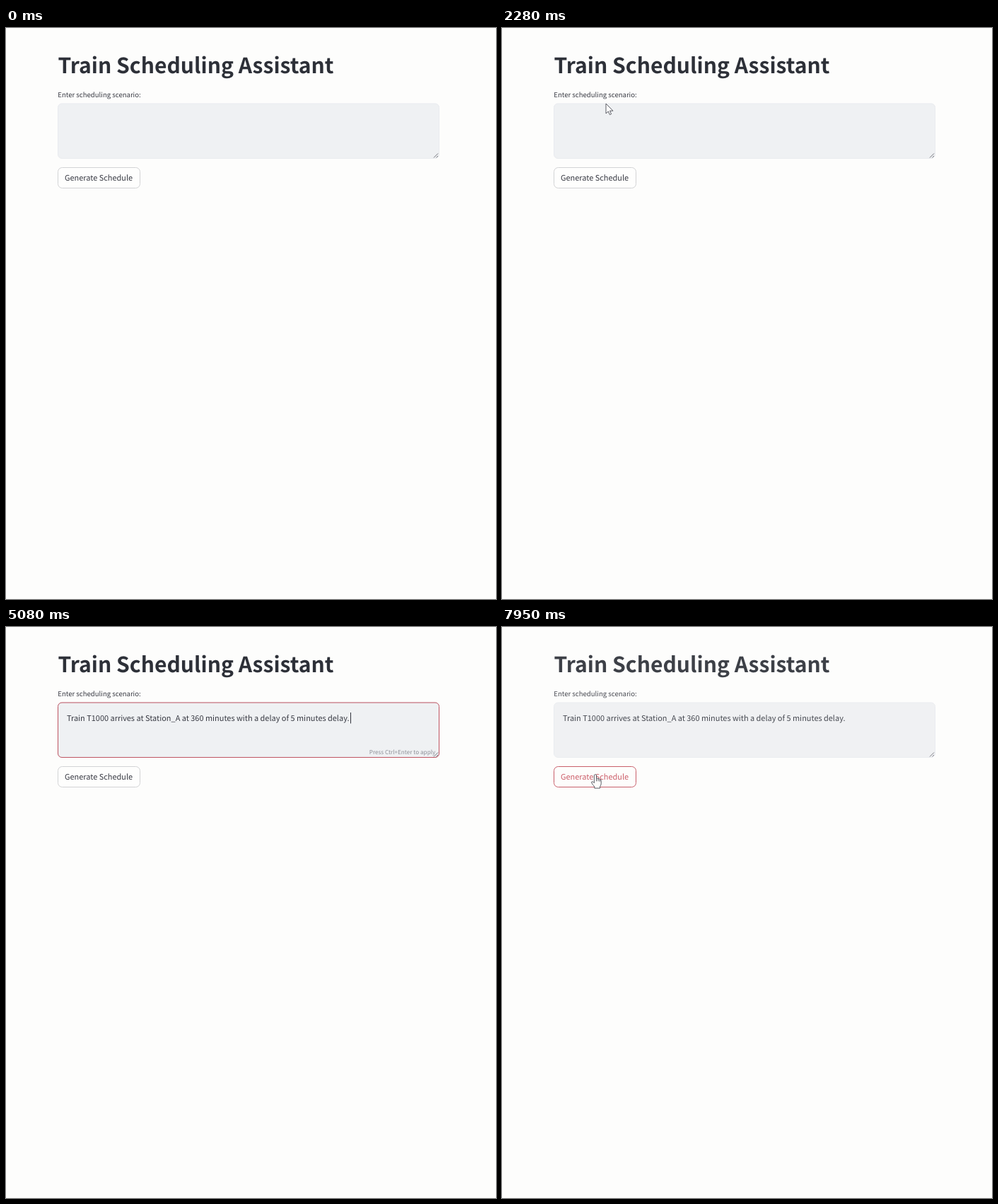
Recreate the animation shown at these times as an HTML page. Size 693x808 px, loop 8000 ms.

```html
<!DOCTYPE html>
<html lang="en">
<head>
<meta charset="utf-8">
<title>Train Scheduling Assistant</title>
<style>
  html, body { margin: 0; width: 100%; height: 100%; overflow: hidden; background: #fdfdfc; }
  svg { display: block; width: 100vw; height: 100vh; }
  text {
    font-family: "Noto Sans CJK JP", "Noto Sans CJK SC", "Noto Sans CJK", "Open Sans", sans-serif;
    font-size: 10.94px;
    fill: #383a43;
    text-rendering: geometricPrecision;
    white-space: pre;
  }
  #title { font-size: 30.1px; font-weight: 700; fill: #2d3038; }
  #label { font-size: 9.57px; }
  #hint { font-size: 8.17px; fill: #8d8f97; text-anchor: end; }
  .pointer { fill: #fdfdfc; stroke: #4a4c55; stroke-width: 0.9; stroke-linejoin: round; }
</style>
</head>
<body>
<svg viewBox="0 0 693 808" xmlns="http://www.w3.org/2000/svg">
  <rect width="693" height="808" fill="#fdfdfc"/>
  <g id="page">
    <text id="title" x="73.5" y="64.3">Train Scheduling Assistant</text>
    <text id="label" x="73.3" y="98">Enter scheduling scenario:</text>
    <rect x="73.5" y="107" width="539" height="77.5" rx="5.5" fill="#eff1f3" stroke="#e9ebef"/>
    <rect id="focus" x="73.5" y="107" width="539" height="77.5" rx="5.5" fill="none" stroke="#bf5562"/>
    <path d="M605 183.5L611 177.5M608.6 183.5L611 181" stroke="#62646b" stroke-width="0.9" fill="none"/>
    <text id="entry" x="86" y="132.9">Train T1000 arrives at Station_A at 360 minutes with a delay of 5 minutes delay.</text>
    <path id="caret" d="M487.5 121V136.5" stroke="#30323a"/>
    <text id="hint" x="607.3" y="180">Press Ctrl+Enter to apply</text>
    <rect id="button" x="73.5" y="197.5" width="116" height="29" rx="6" fill="#fefefd"/>
    <text id="caption" x="83" y="215.9">Generate Schedule</text>
  </g>
  <path id="arrow" class="pointer" d="M0 0V14L3.3 11L5.4 15.7L7.6 14.7L5.5 10.2H10Z"/>
  <path id="beam" d="M-2.5 -7H2.5M0 -7V7M-2.5 7H2.5" stroke="#4a4c55" fill="none"/>
  <path id="hand" class="pointer" d="M-1.6 1.2Q0 -0.8 1.5 1.2V6Q3 5 4 6.6Q5.6 5.8 6.4 7.4Q8.2 7 8.2 9V13.5Q8 16 6.6 17.4V19.8H-1.2V17.6Q-3.4 15.6 -5.6 11.6Q-5.2 9.6 -3 11L-1.6 12.4ZM1.5 6V10M4 6.6V10M6.4 7.4V10.4"/>
</svg>
<script>
const LOOP = 8000;
const FOCUS = 3000, PASTE = 3960, CLICK = 7250, FADE = 7500;
const BLINK = 1060;

// Pointer keys: time, x, y
const ENTER = [[2000, 178, 62], [2280, 147, 107], [2560, 160, 128], [FOCUS, 162, 130]];
const RETURN = [[5990, 165, 150], [6250, 136, 217], [6500, 120.8, 206.3],
                [6850, 122, 209], [7250, 132, 208.3], [LOOP, 132, 208.3]];

const el = id => document.getElementById(id);
const clamp = v => Math.min(1, Math.max(0, v));
const ease = v => v * v * (3 - 2 * v);
const show = (id, on) => el(id).setAttribute("visibility", on ? "visible" : "hidden");

function along(keys, t) {
  let i = 0;
  while (i < keys.length - 2 && t >= keys[i + 1][0]) i++;
  const [t0, x0, y0] = keys[i], [t1, x1, y1] = keys[i + 1];
  const k = ease(clamp((t - t0) / (t1 - t0)));
  return [x0 + (x1 - x0) * k, y0 + (y1 - y0) * k];
}

function pointerAt(t) {
  if (t >= ENTER[0][0] && t < 3400) return along(ENTER, t);
  if (t >= RETURN[0][0]) return along(RETURN, t);
  return null;
}

function drawPointer(t) {
  const p = pointerAt(t);
  let kind = null;
  if (p) {
    const y = p[1];
    kind = y >= 198 ? "hand" : y > 108 && y < 184 ? "beam" : "arrow";
  }
  for (const id of ["arrow", "beam", "hand"]) {
    show(id, id === kind);
    if (id === kind) el(id).setAttribute("transform", `translate(${p[0]} ${p[1]})`);
  }
  return kind === "hand";
}

function draw(t) {
  const focused = t >= FOCUS && t < CLICK;
  const pasted = t >= PASTE;
  const hover = drawPointer(t);

  show("focus", focused);
  el("focus").setAttribute("opacity", clamp((t - FOCUS) / 150));
  show("entry", pasted);
  show("hint", pasted && focused);

  const blinkStart = pasted ? PASTE : FOCUS;
  show("caret", focused && (t - blinkStart) % BLINK < BLINK / 2);
  el("caret").setAttribute("transform", pasted ? "" : "translate(-401 0)");

  el("button").setAttribute("stroke", hover ? "#c4525e" : "#d2d3d5");
  el("caption").style.fill = hover ? "#c8505d" : "";
  el("page").setAttribute("opacity", 1 - 0.08 * clamp((t - FADE) / 450));
}

function tick(now) {
  draw(now % LOOP);
  requestAnimationFrame(tick);
}

draw(0);
requestAnimationFrame(tick);
</script>
</body>
</html>
```
